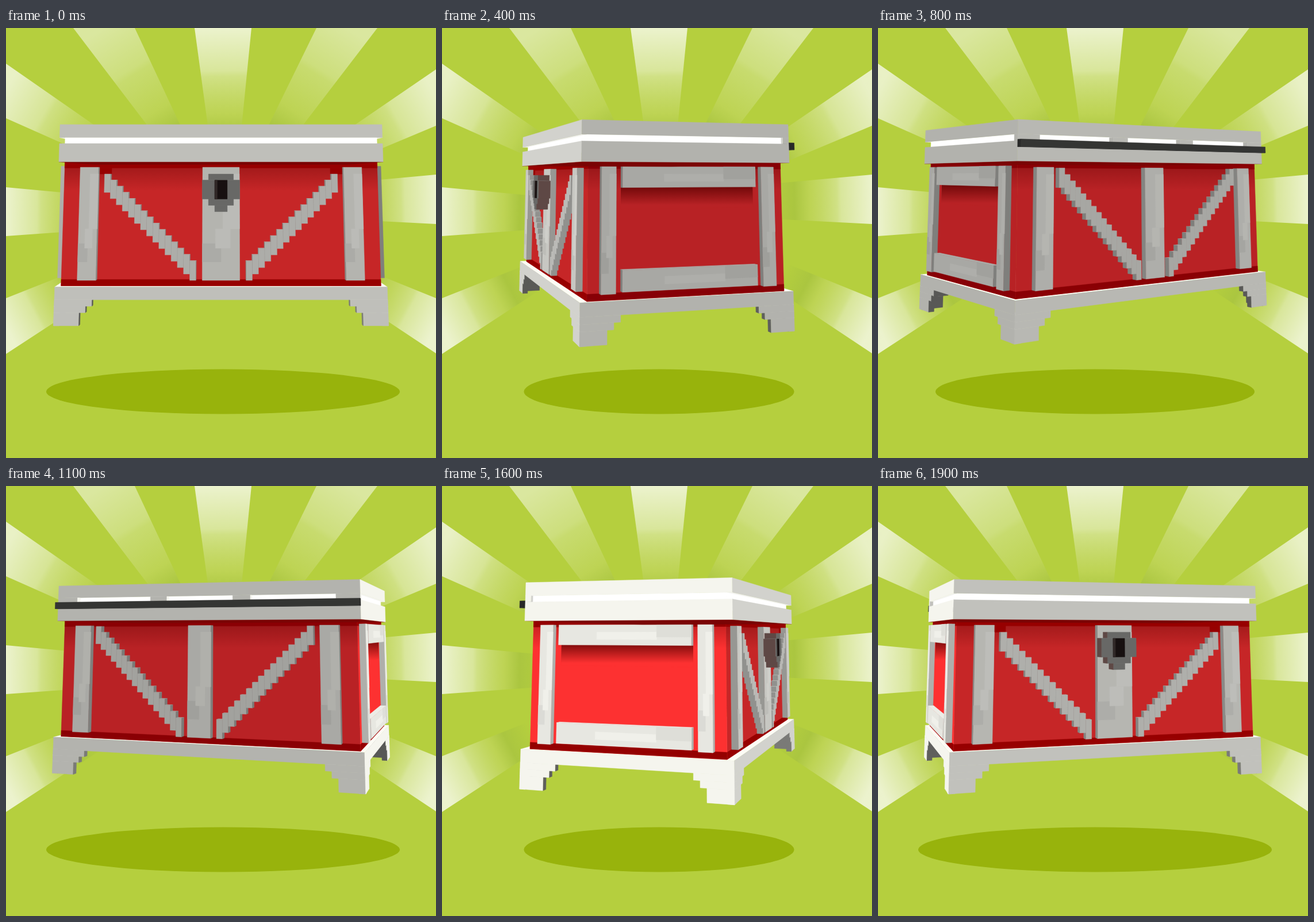
Recreate the animation shown at these times as an HTML page with a canvas. Size 748x748 px, loop 2 s.

```html
<!DOCTYPE html>
<html lang="en">
<head>
<meta charset="utf-8">
<title>Spinning chest</title>
<style>
  html, body { margin: 0; width: 100%; height: 100%; overflow: hidden; background: #b5cf3e; }
  canvas { display: block; }
</style>
</head>
<body>
<canvas id="stage" width="748" height="748"></canvas>
<script>
const ctx = document.getElementById('stage').getContext('2d');

// Lengths are in voxels; y points down and is 0 at eye level.
const VOXEL = 9.6, CAMERA = 133.6, TILT = 0.15;
const BASE_X = 26.5, BASE_Z = 17, BODY_X = 25.75, BODY_Z = 15.8;
const STEPS = 20, STEP_MS = 100;

const GREY = { front: 191, right: 178, back: 177, left: 245 };
const RED = { front: '#c62627', right: '#b82225', back: '#b92225', left: '#fd3131' };
const DARK_RED = { front: '#970000', right: '#870006', back: '#8a0004', left: '#940000' };
const SIDES = Object.keys(GREY);

let cos = 1, sin = 0, centerX = 374, eyeY = 258;

function project([x, y, z]) {
  const depth = x * sin + z * cos;
  const scale = VOXEL * CAMERA / (CAMERA - depth - TILT * (y - 24));
  return [centerX + scale * (x * cos - z * sin), eyeY + scale * y];
}

const grey = v => `rgb(${v | 0},${v | 0},${(v * 0.975) | 0})`;

// The long sides get lighter at a glancing angle.
const toneOf = side => GREY[side] + (side === 'front' || side === 'back' ? 22 * sin * sin : 0);

function path(points) {
  ctx.beginPath();
  points.forEach(p => ctx.lineTo(p[0], p[1]));
  ctx.closePath();
}

// Fills a face when it is turned towards the viewer.
function quad(corners, color) {
  const p = corners.map(project);
  let area = 0;
  p.forEach(([x, y], i) => {
    const [nx, ny] = p[(i + 1) % 4];
    area += x * ny - nx * y;
  });
  if (area <= 0) return null;
  path(p);
  ctx.fillStyle = ctx.strokeStyle = color;
  ctx.lineWidth = 0.5;
  ctx.fill();
  ctx.stroke();
  return p;
}

function box([x0, x1, y0, y1, z0, z1], paint) {
  const faces = {
    top: [[x0, y0, z0], [x1, y0, z0], [x1, y0, z1], [x0, y0, z1]],
    bottom: [[x0, y1, z1], [x1, y1, z1], [x1, y1, z0], [x0, y1, z0]],
    front: [[x0, y0, z1], [x1, y0, z1], [x1, y1, z1], [x0, y1, z1]],
    right: [[x1, y0, z1], [x1, y0, z0], [x1, y1, z0], [x1, y1, z1]],
    back: [[x1, y0, z0], [x0, y0, z0], [x0, y1, z0], [x1, y1, z0]],
    left: [[x0, y0, z0], [x0, y0, z1], [x0, y1, z1], [x0, y1, z0]]
  };
  for (const name in faces) quad(faces[name], paint(name));
}

// A box between two opposite corners given in any order.
function boxBetween(a, b, paint) {
  box([0, 1, 2].flatMap(i => [Math.min(a[i], b[i]), Math.max(a[i], b[i])]), paint);
}

const slab = (hx, y0, y1, hz, paint) => box([-hx, hx, y0, y1, -hz, hz], paint);
const stoneOver = underside => face =>
  face === 'top' ? grey(252) : face === 'bottom' ? underside : grey(toneOf(face));
const stone = stoneOver(grey(105));
const white = () => '#fff';

// Maps a point on a side (u to the right, v down, out from the centre) to space.
function onSide(side, u, v, out) {
  if (side === 'front') return [u, v, out];
  if (side === 'back') return [-u, v, -out];
  if (side === 'right') return [out, v, -u];
  return [-out, v, u];
}

function sideQuad(side, u0, u1, v0, v1, out, color) {
  return quad([[u0, v0], [u1, v0], [u1, v1], [u0, v1]].map(([u, v]) => onSide(side, u, v, out)), color);
}

// Lays a shadow over a projected face, fading out downwards.
function shadeDown(p, height, alpha) {
  const y = Math.min(p[0][1], p[1][1]);
  const shade = ctx.createLinearGradient(0, y, 0, y + height);
  shade.addColorStop(0, `rgba(90,0,0,${alpha})`);
  shade.addColorStop(1, 'rgba(90,0,0,0)');
  path(p);
  ctx.fillStyle = shade;
  ctx.fill();
}

const isLong = side => side === 'front' || side === 'back';
const wallOf = side => isLong(side) ? BODY_Z : BODY_X;

function facesViewer(side) {
  const [x, , z] = onSide(side, 0, 0, 1);
  return x * sin + z * cos > wallOf(side) / CAMERA;
}

function trim(side) {
  const wall = wallOf(side), parts = [];
  const add = (u0, u1, v0, v1, kind) => parts.push({ u0, u1, v0, v1, kind, near: wall, far: wall + 1 });
  const stairs = (outer, inner, start) => {
    for (let i = 0; i < outer - inner; i++) {
      add(-outer + i, -outer + i + 1, start + i, start + i + 3, 'stair');
      add(outer - i - 1, outer - i, start + i, start + i + 3, 'stair');
    }
  };
  if (!isLong(side)) {
    add(-14, -11.8, -1.3, 17, 'post');
    add(11.8, 14, -1.3, 17, 'post');
    add(-10.8, 10.8, -1.3, 1.8, 'beam');
    add(-10.8, 10.8, 13.7, 16.8, 'beam');
    return parts;
  }
  const half = side === 'front' ? 3 : 2;
  add(-23, -20, -1.1, 17, 'post');
  add(20, 23, -1.1, 17, 'post');
  add(-half, half, -1.1, 17, 'post');
  if (side === 'front') {
    stairs(19, 4, 0);
    [[2, 0, 1], [1, 5, 6], [2, 4, 5], [3, 1, 4]].forEach(([w, v0, v1]) =>
      parts.push({ u0: -w, u1: w, v0, v1, kind: 'lock', near: wall + 1, far: wall + 3 }));
  } else {
    stairs(19, 3, -1);
  }
  return parts;
}

const TRIM = Object.fromEntries(SIDES.map(side => [side, trim(side)]));

function drawPart(side, part) {
  const { u0, u1, v0, v1, near, far, kind } = part;
  const a = onSide(side, u0, v0, near), b = onSide(side, u1, v1, far);
  if (kind === 'lock') {
    boxBetween(a, b, face =>
      face === side ? '#686866' : face === 'top' ? '#777' : face === 'bottom' ? '#3d3c3b' : '#5e4845');
    if (v0 === 1) {
      sideQuad(side, -1, 1, 1, 4, far, '#171010');
      sideQuad(side, -1, -0.6, 1, 4, far, '#302827');
    }
    return;
  }
  const tone = toneOf(side) * (kind === 'stair' ? 0.91 : 0.945);
  boxBetween(a, b, face =>
    grey(tone * (face === side ? 1 : face === 'top' ? 1.02 : face === 'bottom' ? 0.55 : 0.76)));
  const patch = (p0, p1, q0, q1, k) => sideQuad(side,
    u0 + (u1 - u0) * p0, u0 + (u1 - u0) * p1, v0 + (v1 - v0) * q0, v0 + (v1 - v0) * q1, far, grey(tone * k));
  if (kind === 'post') {
    patch(0.55, 1, 0.06, 0.55, 1.04);
    patch(0, 0.5, 0.68, 0.84, 0.95);
    patch(0.35, 0.75, 0.55, 0.72, 1.04);
  } else {
    if (kind === 'beam') patch(0.3, 0.75, 0.36, 0.72, 1.04);
    if (kind === 'beam') patch(0.75, 1, 0, 0.6, 0.96);
  }
}

function drawTrim(side) {
  const depth = p => {
    const [x, , z] = onSide(side, (p.u0 + p.u1) / 2, 0, (p.near + p.far) / 2);
    return x * sin + z * cos;
  };
  [...TRIM[side]].sort((a, b) => depth(a) - depth(b)).forEach(part => drawPart(side, part));
}

function drawWall(side) {
  const half = isLong(side) ? BODY_X : BODY_Z, out = wallOf(side);
  const p = sideQuad(side, -half, half, -2, 18, out, RED[side]);
  if (!p) return;
  shadeDown(p, 50, 0.4);
  if (!isLong(side)) {
    shadeDown(sideQuad(side, -10.8, 10.8, 1.6, 5, out, RED[side]), 34, 0.8);
  }
  sideQuad(side, -half, half, -2, -1, out, DARK_RED[side]);
  sideQuad(side, -half, half, 17, 18, out, DARK_RED[side]);
  if (side === 'front') {
    sideQuad(side, -20, -18, -1, 0, out, DARK_RED[side]);
    sideQuad(side, 18, 20, -1, 0, out, DARK_RED[side]);
  }
}

// Each leg is two stepped panels, one voxel thick, meeting at the corner.
function drawLeg(sx, sz) {
  const x = sx * BASE_X, z = sz * BASE_Z;
  const inner = { front: sz < 0, back: sz > 0, left: sx > 0, right: sx < 0 };
  const paint = face => inner[face] ? grey(GREY[face] * 0.5) : stone(face);
  const alongX = w => [w, 1], alongZ = w => [1, w];
  const panels = sx * sin * BASE_X > sz * cos * BASE_X === sx * sin > 0 ? [alongX, alongZ] : [alongZ, alongX];
  const depth = size => {
    const [dx, dz] = size(4);
    return (x - sx * dx / 2) * sin + (z - sz * dz / 2) * cos;
  };
  panels.sort((a, b) => depth(a) - depth(b)).forEach(size => {
    [[4, 22, 24], [5, 21, 22], [6, 20, 21]].forEach(([w, y0, y1]) => {
      const [dx, dz] = size(w);
      boxBetween([x, y0, z], [x - sx * dx, y1, z - sz * dz], paint);
    });
  });
}

function drawBase() {
  const depth = ([x, z]) => x * BASE_X * sin + z * BASE_Z * cos;
  [[-1, -1], [1, -1], [-1, 1], [1, 1]]
    .sort((a, b) => depth(a) - depth(b))
    .forEach(([sx, sz]) => drawLeg(sx, sz));
  slab(BASE_X, 18, 20, BASE_Z, stone);
}

function drawHingeBlocks() {
  [[-26.5, -22.7], [-8.8, -5.8], [5.8, 8.8], [22.7, 26.5]].forEach(([x0, x1]) =>
    box([x0, x1, -6, -5, -17, -16], stone));
}

function drawHingeBar() {
  box([-26.5, 26.5, -5.2, -4.1, -18, -17], face => face === 'back' ? '#343533' : '#282928');
}

function drawLid() {
  const backVisible = facesViewer('back');
  if (!backVisible) drawHingeBar();
  slab(BASE_X, -8.15, -6, BASE_Z, stoneOver('#f4f4f0'));
  if (!backVisible) drawHingeBlocks();
  slab(25.8, -6, -5, 16, white);
  if (backVisible) drawHingeBlocks();
  slab(BASE_X, -5, -2, BASE_Z, stoneOver('#7a0404'));
  if (backVisible) drawHingeBar();
}

// Each ray: two outer corners, the point it narrows to, fade length, strength.
const RAYS = [
  [328, 0, 427, 0, 385, 420, 165, 0.74],
  [117, 0, 224, 0, 396, 367, 190, 0.5], [540, 0, 646, 0, 351, 385, 190, 0.5],
  [0, 62, 0, 157, 378, 325, 170, 0.7], [748, 72, 748, 170, 378, 325, 170, 0.7],
  [0, 277, 0, 362, 517, 325, 120, 0.74], [748, 255, 748, 341, 150, 310, 120, 0.74],
  [0, 470, 0, 567, 378, 320, 120, 0.74], [748, 470, 748, 566, 378, 320, 120, 0.74]
];

function drawRays() {
  for (const [x1, y1, x2, y2, aimX, aimY, length, alpha] of RAYS) {
    const mx = (x1 + x2) / 2, my = (y1 + y2) / 2;
    const dx = aimX - mx, dy = aimY - my, k = length * 1.5 / Math.hypot(dx, dy);
    const fade = ctx.createLinearGradient(mx, my, mx + dx * k, my + dy * k);
    fade.addColorStop(0, `rgba(255,255,255,${alpha})`);
    fade.addColorStop(0.3, `rgba(255,255,255,${alpha * 0.65})`);
    fade.addColorStop(0.34, `rgba(255,255,255,${alpha * 0.5})`);
    fade.addColorStop(0.6, 'rgba(215,225,150,.25)');
    fade.addColorStop(0.75, 'rgba(140,170,70,.25)');
    fade.addColorStop(1, 'rgba(140,170,70,0)');
    path([[x1, y1], [x2, y2], [aimX, aimY]]);
    ctx.fillStyle = fade;
    ctx.fill();
  }
}

function drawShadow(step) {
  const turn = step % 10, fold = Math.min(turn, 10 - turn);
  ctx.beginPath();
  ctx.ellipse(377.5, 632.5, fold < 2 ? 307.5 : fold < 4 ? 277.5 : 235, 39, 0, 0, 2 * Math.PI);
  ctx.fillStyle = '#98b30c';
  ctx.fill();
}

function placeChest(step) {
  const angle = step / STEPS * 2 * Math.PI;
  cos = Math.cos(angle);
  sin = Math.sin(angle);
  eyeY = 256.5 - 2.5 * cos * cos;
  centerX = 0;
  const xs = [-1, 1].flatMap(i => [-1, 1].map(j => project([i * BASE_X, 24, j * BASE_Z])[0]));
  centerX = 374 - (Math.min(...xs) + Math.max(...xs)) / 2;
}

function draw() {
  const step = Math.floor(performance.now() / STEP_MS) % STEPS;
  ctx.fillStyle = '#b5cf3e';
  ctx.fillRect(0, 0, 748, 748);
  drawRays();
  drawShadow(step);
  placeChest(step);
  drawBase();
  SIDES.filter(side => !facesViewer(side)).forEach(drawTrim);
  SIDES.forEach(drawWall);
  SIDES.filter(facesViewer).forEach(drawTrim);
  drawLid();
  requestAnimationFrame(draw);
}
draw();
</script>
</body>
</html>
```
